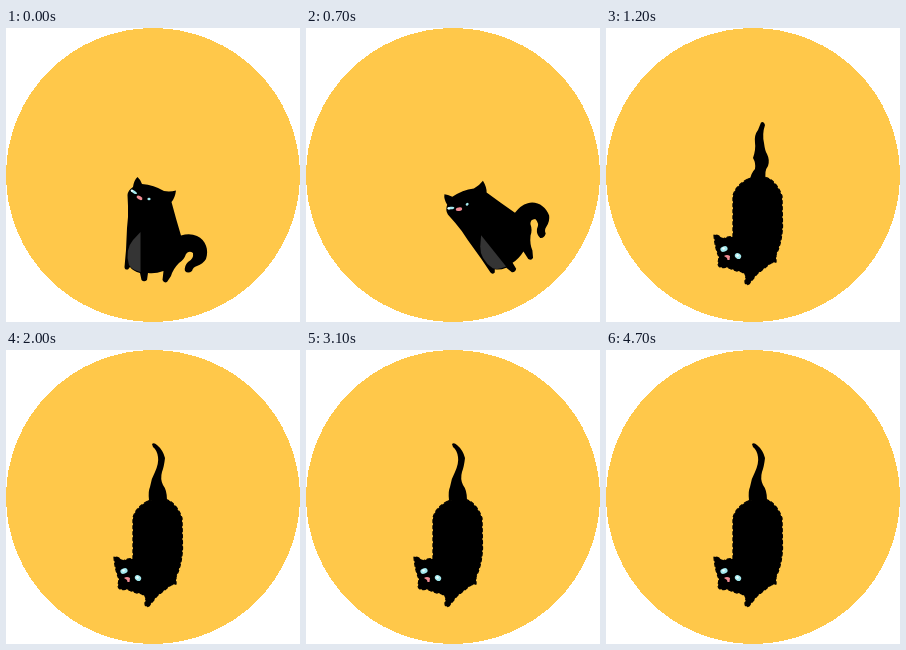
These frames come from a looping animation (294 px wide and 294 px high, 4800 ms). An HTML page:

```html
<!DOCTYPE html>
<html lang="en">
<head>
<meta charset="utf-8">
<title>Tumbling cat</title>
<style>
  html, body { margin: 0; width: 100%; height: 100%; overflow: hidden; background: #fff; }
  svg { display: block; width: 100%; height: 100%; }
  .fur { fill: #000; }
  .fuzz { stroke: #000; stroke-width: 1.3; stroke-dasharray: 3 3; stroke-linecap: round; }
  .eye { fill: #a4e9ee; }
  .glint { fill: #f4ffff; }
  .mouth { fill: #ef8b93; }
  .belly { fill: #343434; }
</style>
</head>
<body>
<svg viewBox="0 0 294 294">
  <circle cx="147" cy="147" r="147" fill="#ffc84a" shape-rendering="crispEdges"/>

  <g id="sitting">
    <path class="fur" d="M131.500 149 Q134 151 136 156 Q148 157 158 163 Q164 164 170 162.500
      Q169 170 165.500 174 Q170 191 175 207.500
      Q184 205 191 208 C200 212 203 222 200 231 Q197 236 191 238 Q187 239 186 243
      Q182 246 179 243 Q178 238 182 234 Q188 231 187 225 Q183 222 180 226
      Q178 232 173 235 Q167 241 165 248 L161 254 Q158 255.500 156.500 252 L157.500 243
      Q149 246 142 245 L141 252 Q138 254.500 135.500 252 L134 245
      Q127 243 124 239 L122 241.500 Q118.500 242 118.500 239 L120 222
      L121 200 Q122.500 188 122 178 L121.500 167 Q122 162 127 159 Q128 152 131.500 149Z"/>
    <path class="belly" d="M134.500 204 V244 Q126 242 123 237 Q118.500 222 127 212Z"/>
    <ellipse class="eye" cx="127.800" cy="163.800" rx="3.600" ry="1.300" transform="rotate(32 127.800 163.800)"/>
    <circle class="glint" cx="126" cy="162.800" r="1.100"/>
    <ellipse class="eye" cx="143" cy="171" rx="1.600" ry="1.200"/>
    <ellipse class="mouth" cx="133.500" cy="169.800" rx="3.200" ry="1.800" transform="rotate(30 133.500 169.800)"/>
  </g>

  <g id="lying">
    <path id="tail" class="fur"/>
    <path class="fur fuzz" d="M142 151 Q153 147 164 151 Q172 157 176 168
      L176.500 198 Q176 214 170 227 L170 234 L165 235 L151 246
      L143 256 Q139 258 139 253 L140 248 Q137 243 131 243 L120 239 Q113 241 112 236
      L113 229 Q109 220 108 207 Q111 206 117 211 Q122 208 127 209
      L127 168 Q129 158 142 151Z"/>
    <ellipse class="eye" cx="118" cy="221" rx="3.700" ry="2.600" transform="rotate(-20 118 221)"/>
    <circle class="glint" cx="117.500" cy="220.500" r="1.200"/>
    <ellipse class="eye" cx="132" cy="228" rx="3.300" ry="2.700" transform="rotate(35 132 228)"/>
    <circle class="glint" cx="131.500" cy="227.500" r="1.200"/>
    <path class="mouth" d="M118 228 Q121 226 124 228 L123.500 232 L121.500 232 L121 230Z"/>
  </g>
</svg>
<script>
  const STEP = 100, STEPS = 48, SPIN_STEPS = 8;
  const TAIL_RIGHT = "M155 94.500 Q158 93 159 97 Q156 106 158 115 Q159 123 161 126 Q164 132 162 138 Q158 143 160 152 H144 Q145 145 149 141 Q150 135 147 130 Q150 121 149 115 Q148 107 152 102Z";
  const TAIL_LEFT = "M146 94 Q148 92 151 95 Q157 100 159 108 Q158 117 156 122 Q154 129 157 135 Q161 140 161 150 H143 Q142 141 144 137 Q145 129 149 122 Q153 113 152 107 Q151 100 147 97Z";
  const [sitting, lying, tail] = ["sitting", "lying", "tail"].map(id => document.getElementById(id));
  const show = (el, on) => el.setAttribute("visibility", on ? "visible" : "hidden");

  // One full turn, slightly eased at both ends.
  const spinAngle = turn => 360 * turn - 9 * Math.sin(2 * Math.PI * turn);

  function draw(ms) {
    const step = Math.floor((ms + 2) / STEP) % STEPS;
    const spinning = step < SPIN_STEPS;
    show(sitting, spinning);
    show(lying, !spinning);
    sitting.setAttribute("transform", `rotate(${spinAngle(step / SPIN_STEPS)} 159.500 147.700)`);

    // The wag pauses for one beat in every nine.
    const pauses = Math.max(0, Math.floor((step - 10) / 9));
    tail.setAttribute("d", (step - pauses) % 2 ? TAIL_LEFT : TAIL_RIGHT);
  }

  let start;
  function tick(now) {
    start ??= now;
    draw(now - start);
    requestAnimationFrame(tick);
  }
  draw(0);
  requestAnimationFrame(tick);
</script>
</body>
</html>
```
